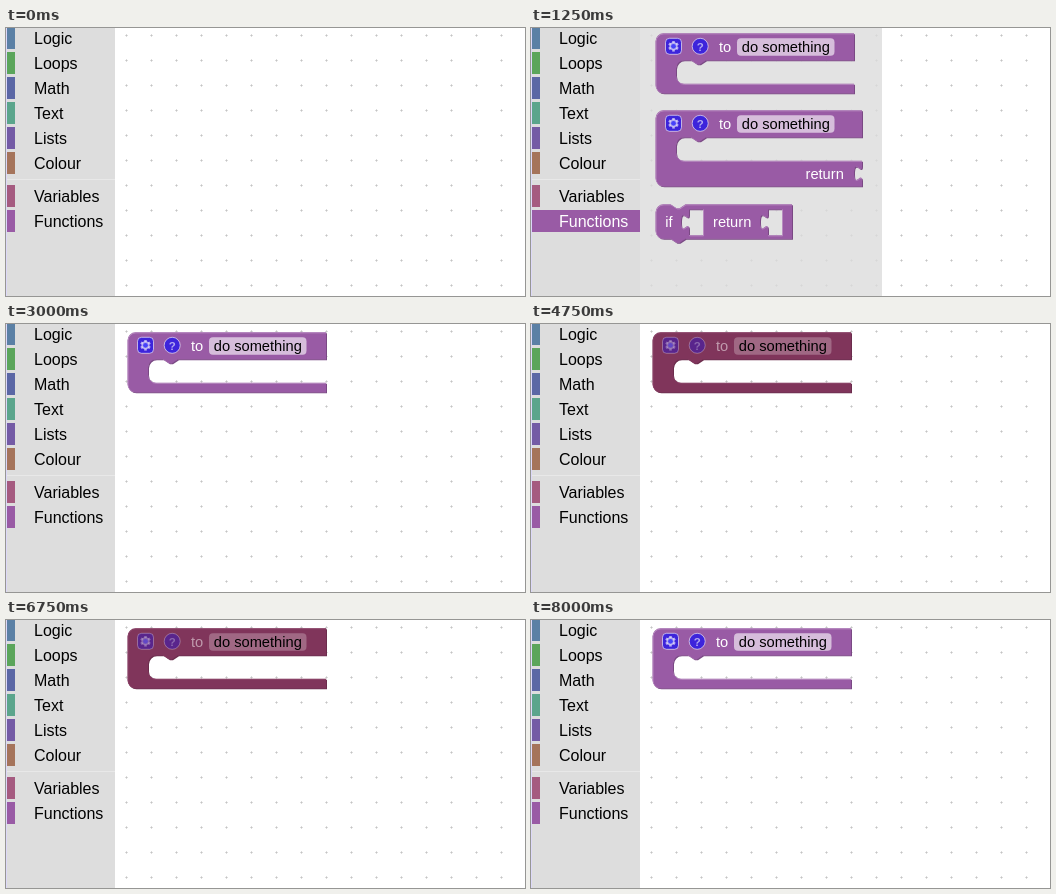
Write an HTML page with a canvas that moves like this. It is 519 by 268 pixels and loops after 8500 ms.

```html
<!DOCTYPE html>
<html lang="en">
<head>
<meta charset="utf-8">
<title>Block editor</title>
<style>
html, body { margin: 0; width: 100%; height: 100%; overflow: hidden; background: #fff; }
canvas { display: block; }
</style>
</head>
<body>
<canvas id="stage" width="519" height="268"></canvas>
<script>
const ctx = document.getElementById('stage').getContext('2d');
const LOOP = 8500;
const FAMILY = '"Liberation Sans", Arial, sans-serif';
const PURPLE = '#995ba5';

const categories = [
  ['Logic', '#5b80a5'], ['Loops', '#5ba55b'], ['Math', '#5b67a5'],
  ['Text', '#5ba58c'], ['Lists', '#745ba5'], ['Colour', '#a5745b'],
  ['Variables', '#a55b80'], ['Functions', PURPLE]
];

// Block outlines, relative to each block's top left corner
const TAB = 'c0,10 -8,-8 -8,7.5 s8,-2.5 8,7.5';
const procedure = (width, height, right) => new Path2D(
  `M0,8 a8,8 0 0 1 8,-8 H${width} V27 H50.5 l-6,4 h-3 l-6,-4 h-7 ` +
  `a8,8 0 0 0 -8,8 V42.5 a8,8 0 0 0 8,8 H${width} ${right} V${height} ` +
  `H8 a8,8 0 0 1 -8,-8 Z`);
const socket = x => `M${x},5 v5 ${TAB} v6 h14 v-26 Z`;

const plainShape = procedure(198.5, 60, '');
const returnShape = procedure(206.5, 76, 'v5 ' + TAB);
const ifShape = new Path2D(
  'M0,8 a8,8 0 0 1 8,-8 h7 l6,4 h3 l6,-4 H136.5 V34.5 H30 l-6,4 h-3 l-6,-4 h-7 ' +
  'a8,8 0 0 1 -8,-8 Z ' + socket(33.5) + socket(112.5));

function rect(x, y, w, h, color) {
  ctx.fillStyle = color;
  ctx.fillRect(x, y, w, h);
}

function text(string, x, y, color, size = 14.667, weight = '') {
  ctx.font = `${weight} ${size}px ${FAMILY}`;
  ctx.fillStyle = color;
  ctx.fillText(string, x, y);
}

function disc(x, y, r, color) {
  ctx.fillStyle = color;
  ctx.beginPath();
  ctx.arc(x, y, r, 0, Math.PI * 2);
  ctx.fill();
}

function drawGrid() {
  for (let i = 0; i < 16; i++) {
    for (let j = 0; j < 11; j++) {
      const x = Math.floor(120.8 + 24.95 * i);
      const y = Math.floor(7.9 + 24.95 * j);
      rect(x - 1, y, 3, 1, '#dcdcdc');
      rect(x, y - 1, 1, 3, '#dcdcdc');
      rect(x, y, 1, 1, '#c4c4c4');
    }
  }
}

function drawSidebar(open) {
  rect(0, 0, 109, 268, '#ddd');
  rect(0, 0, 1, 268, '#dcd8f8');
  rect(1, 151, 108, 1, '#e8e8e8');
  categories.forEach(([name, color], i) => {
    const top = 25 * i - 1 + (i > 5 ? 8 : 0);
    const selected = open && name === 'Functions';
    rect(1, top, selected ? 108 : 8, 22, color);
    text(name, 28, top + 17, selected ? '#fff' : '#000', 16);
  });
}

function drawShape(shape, fill, dark, light, selected) {
  ctx.save();
  ctx.translate(1, 1);
  ctx.fillStyle = dark;
  ctx.fill(shape, 'evenodd');
  ctx.restore();
  ctx.fillStyle = fill;
  ctx.fill(shape, 'evenodd');
  if (selected) {
    ctx.strokeStyle = '#fc3';
    ctx.lineWidth = 3;
    ctx.stroke(shape);
    return;
  }
  ctx.save();
  ctx.clip(shape, 'evenodd');
  ctx.translate(0.5, 0.5);
  ctx.strokeStyle = light;
  ctx.lineWidth = 1;
  ctx.stroke(shape);
  ctx.restore();
}

function roundBox(x, y, w, h, r) {
  ctx.beginPath();
  ctx.roundRect(x, y, w, h, r);
}

function drawIcons(alpha) {
  ctx.save();
  ctx.globalAlpha = alpha;
  ctx.fillStyle = '#00f';
  ctx.strokeStyle = '#fff';
  ctx.lineWidth = 1;
  roundBox(10, 5, 16, 16, 4);
  ctx.fill();
  ctx.stroke();
  ctx.beginPath();
  ctx.arc(44.7, 13, 8, 0, Math.PI * 2);
  ctx.fill();
  ctx.stroke();

  disc(18, 13, 4, '#fff');
  for (let i = 0; i < 6; i++) {
    ctx.save();
    ctx.translate(18, 13);
    ctx.rotate(i * Math.PI / 3);
    rect(-1.3, -5.3, 2.6, 2, '#fff');
    ctx.restore();
  }
  disc(18, 13, 2.4, '#00f');
  ctx.textAlign = 'center';
  text('?', 44.7, 17.2, '#fff', 11.5, 'bold');
  ctx.restore();
}

function drawProcedure(x, y, { shape = plainShape, selected = false, dimmed = false } = {}) {
  const strength = dimmed ? 0.5 : 1;
  ctx.save();
  ctx.translate(x, y);
  if (dimmed) drawShape(shape, '#80355b', '#6b2c4c', '#8b456a', false);
  else drawShape(shape, PURPLE, '#7a4984', '#b88cc0', selected);
  drawIcons(0.6 * strength);
  text('to', 63.5, 18.7, `rgba(255,255,255,${strength})`);
  ctx.fillStyle = `rgba(255,255,255,${dimmed ? 0.25 : 0.6})`;
  roundBox(81.5, 5, 97.5, 17.5, 4);
  ctx.fill();
  text('do something', 86.3, 18.7, '#000');
  if (shape === returnShape) text('return', 150, 68.7, '#fff');
  ctx.restore();
}

function drawFlyout(hovered) {
  rect(109, 0, 242, 268, 'rgba(221,221,221,0.8)');
  drawProcedure(124.5, 5.3, { selected: hovered });
  drawProcedure(124.5, 82.3, { shape: returnShape });
  ctx.save();
  ctx.translate(124.5, 176.3);
  drawShape(ifShape, PURPLE, '#7a4984', '#b88cc0', false);
  text('if', 9.8, 23, '#fff');
  text('return', 57.5, 23, '#fff');
  ctx.restore();
}

function draw(t) {
  const open = t >= 1250 && t < 2750;
  rect(0, 0, 519, 268, '#fff');
  drawGrid();
  drawSidebar(open);
  if (open) {
    drawFlyout(t >= 2000);
  } else if (t >= 2750 && t < 3000) {
    drawProcedure(124.5, 6.3, { selected: true });
  } else if (t >= 3000) {
    // Blinks for a quarter of every second
    const dimmed = t >= 4750 && t < 8000 && t % 1000 >= 750;
    drawProcedure(121.5, 8.3, { dimmed });
  }
}

const start = performance.now();
function tick() {
  draw((performance.now() - start) % LOOP);
  requestAnimationFrame(tick);
}
tick();
</script>
</body>
</html>
```
